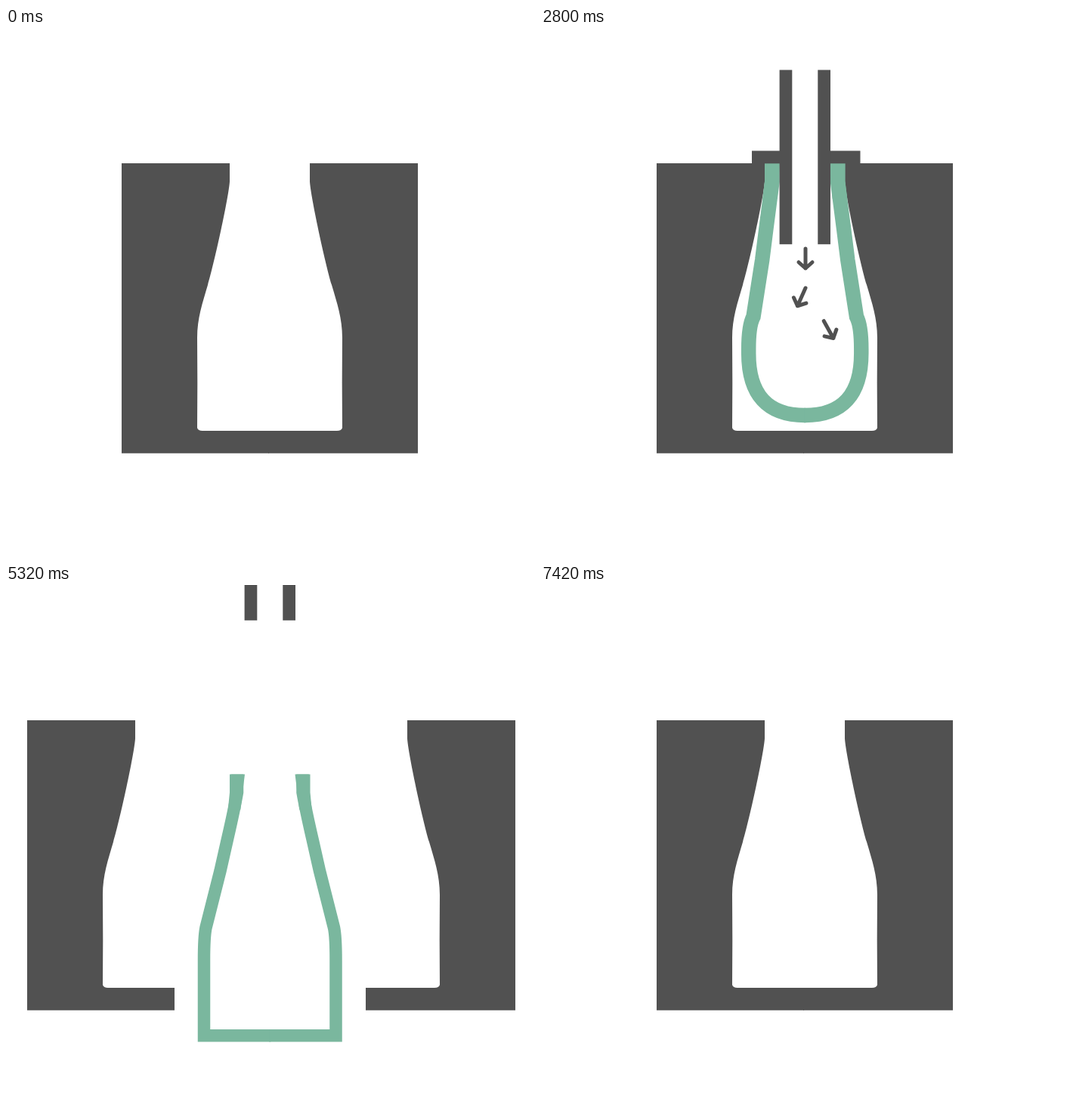
An HTML page with a canvas that plays this animation: 700 px wide and 700 px high, repeating every 7.56 s.

```html
<!DOCTYPE html>
<html lang="en">
<head>
<meta charset="utf-8">
<title>Blow moulding</title>
<style>
html, body { margin: 0; width: 100%; height: 100%; overflow: hidden; background: #fff; }
canvas { display: block; }
</style>
</head>
<body>
<canvas id="stage" width="700" height="700"></canvas>
<script>
const ctx = document.getElementById('stage').getContext('2d');
const TICK = 140, TICKS = 54;
const GREY = '#515151', GREEN = '#7ab79e', WHITE = '#fff';
const TOP = 179, GLASS_AXIS = 349.25;

// Centre line of the left wall: x at set heights, base height, corner rounding, wall width
const preform = { neck: 306, waist: 306, shoulder: 306, side: 306, base: 478.3, round: 0, wall: 19.5 };
const balloon = { neck: 303, waist: 292.7, shoulder: 281, side: 274.7, base: 512.5, round: 74.6, wall: 19.5 };
const bottle = { neck: 302, waist: 283.5, shoulder: 264.5, side: 262, base: 524.8, round: 0, wall: 16.5 };

const clamp01 = v => Math.max(0, Math.min(1, v));
const progress = (t, from, to) => clamp01((t - from) / (to - from));

function blend(a, b, k) {
  const mix = {};
  for (const key in a) mix[key] = a[key] + (b[key] - a[key]) * k;
  return mix;
}

function at(x, y, draw) {
  ctx.save();
  ctx.translate(x, y);
  draw();
  ctx.restore();
}

function mirrorAt(x, draw) {
  at(x, 0, () => {
    ctx.scale(-1, 1);
    draw();
  });
}

function drawMouldHalf(floorEnd) {
  ctx.fillStyle = GREY;
  ctx.beginPath();
  ctx.moveTo(153, TOP);
  ctx.lineTo(296, TOP);
  ctx.lineTo(296, 203);
  ctx.bezierCurveTo(295, 222, 276, 310, 267, 340);
  ctx.bezierCurveTo(260, 364, 253, 384, 253, 410);
  ctx.lineTo(253.3, 470);
  ctx.lineTo(253, 529);
  ctx.quadraticCurveTo(254, 533, 260, 533);
  ctx.lineTo(floorEnd, 533);
  ctx.lineTo(floorEnd, 562.8);
  ctx.lineTo(153, 562.8);
  ctx.fill();
}

function drawMould(open) {
  at(-125 * open, 0, () => drawMouldHalf(348));
  mirrorAt(698 + 129 * open, () => drawMouldHalf(351));
}

function drawWall({ neck, waist, shoulder, side, base, round, wall }) {
  ctx.strokeStyle = ctx.fillStyle = GREEN;
  ctx.lineWidth = wall;
  ctx.beginPath();
  ctx.moveTo(306, TOP);
  ctx.lineTo(306, 203);
  ctx.quadraticCurveTo(neck, 226, (neck + waist) / 2, 266);
  ctx.lineTo(waist, 307);
  ctx.lineTo(shoulder, 382);
  ctx.quadraticCurveTo(side, 394, side, 425);
  ctx.lineTo(side, base - 1.1 * round);
  ctx.quadraticCurveTo(side, base, side + round, base);
  ctx.lineTo(GLASS_AXIS + 1, base);
  ctx.stroke();

  // Rim, tapering into the wall
  ctx.beginPath();
  ctx.moveTo(296, TOP);
  ctx.lineTo(316, TOP);
  ctx.lineTo(neck + wall / 2, 226);
  ctx.lineTo(neck - wall / 2, 226);
  ctx.lineTo(296, 203);
  ctx.fill();
}

function drawGlass(t) {
  const y = t < 9 ? Math.min(0, 55 * t - 488) : Math.max(0, 35.7 * (t - 36));
  const shape = t <= 20
    ? blend(preform, balloon, progress(t, 15, 20))
    : blend(balloon, bottle, progress(t, 20, 26));
  at(0, y, () => {
    drawWall(shape);
    mirrorAt(2 * GLASS_AXIS, () => drawWall(shape));
  });
}

function drawTube(t) {
  const y = t < 28 ? Math.min(0, 57.2 * (t - 13)) : -12.6 - 22.68 * (t - 28);
  ctx.fillStyle = GREY;
  at(0, y, () => {
    for (const x of [315.6, 366.3]) ctx.fillRect(x, 55.5, 16.7, 230.7);
    for (const x of [279, 382.5]) ctx.fillRect(x, 162.5, 40, 16.8);
  });
}

// Arrows run down the tube, then turn off at a bend
const arrows = [
  { lead: 0, turn: 0 },
  { lead: 52, turn: -24 },
  { lead: 102, turn: 29 }
];

function drawArrow({ lead, turn }, t) {
  const path = 305 + lead + 64 * (t - 20);
  if (path < -20 || path > 450) return;
  const past = turn ? Math.max(0, path - 344) : 0;
  const angle = past ? turn * Math.PI / 180 : 0;
  at(350 + past * Math.sin(angle), path - past + past * Math.cos(angle), () => {
    ctx.rotate(-angle);
    ctx.strokeStyle = GREY;
    ctx.lineWidth = 5;
    ctx.lineCap = ctx.lineJoin = 'round';
    ctx.beginPath();
    ctx.moveTo(0, -13);
    ctx.lineTo(0, 13);
    ctx.moveTo(-9, 5);
    ctx.lineTo(0, 13);
    ctx.lineTo(9, 5);
    ctx.stroke();
  });
}

function mouldOpening(t) {
  if (t < 28) return 0;
  return t < 45 ? Math.min(1, 0.1 + 0.18 * (t - 28)) : (53 - t) / 8;
}

function render(t) {
  ctx.fillStyle = WHITE;
  ctx.fillRect(0, 0, 700, 700);
  drawMould(mouldOpening(t));
  drawGlass(t);
  drawTube(t);
  arrows.forEach(arrow => drawArrow(arrow, t));
}

const start = performance.now();
function frame() {
  const elapsed = performance.now() - start;
  render(Math.floor(elapsed / TICK) % TICKS);
  requestAnimationFrame(frame);
}
frame();
</script>
</body>
</html>
```
